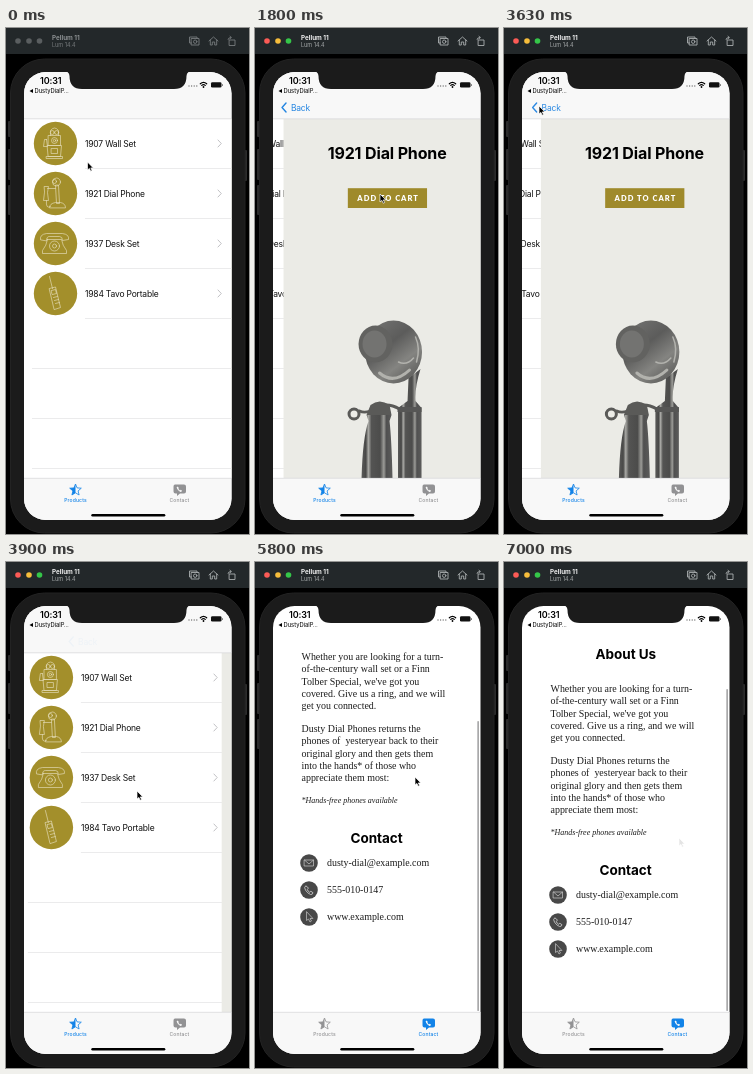
An HTML page that plays this animation: 243x506 px, repeating every 7.6 s.

```html
<!DOCTYPE html>
<html lang="en">
<head>
<meta charset="utf-8">
<title>Phone shop demo</title>
<style>
  html, body { margin: 0; width: 100%; height: 100%; overflow: hidden; background: #000; }
  svg { display: block; width: 100%; height: 100%; }
  text { font-family: Inter, "Open Sans", sans-serif; white-space: pre; }
  .row { font-size: 8.5px; letter-spacing: -.2px; fill: #111; }
  .head { font-size: 13.5px; font-weight: 700; letter-spacing: -.03px; text-anchor: middle; }
  .serif { font: 9.95px "Liberation Serif", "Noto Serif", serif; fill: #1c1c1c; }
  .note { font: italic 8px "Liberation Serif", "Noto Serif", serif; fill: #1c1c1c; }
  .tab { font-size: 5px; font-weight: 500; letter-spacing: .15px; text-anchor: middle; }
  .line { fill: none; stroke-linecap: round; stroke-linejoin: round; }
</style>
</head>
<body>
<svg viewBox="0 0 243 506" preserveAspectRatio="none">
  <defs>
    <clipPath id="screen"><rect x="18" y="44" width="207.500" height="448" rx="21.500"/></clipPath>
    <clipPath id="body"><rect x="18" y="91" width="208" height="359"/></clipPath>
    <clipPath id="page"><rect x="18" y="68" width="208" height="382"/></clipPath>
    <linearGradient id="tube">
      <stop offset="0" stop-color="#5a5a59"/><stop offset=".14" stop-color="#484847"/>
      <stop offset=".22" stop-color="#a9a9a5"/><stop offset=".32" stop-color="#545453"/>
      <stop offset=".6" stop-color="#4c4c4b"/><stop offset=".72" stop-color="#9c9c98"/>
      <stop offset=".8" stop-color="#505050"/><stop offset="1" stop-color="#5c5c5b"/>
    </linearGradient>
    <linearGradient id="disc" x1="0" y1="0" x2=".7" y2="1">
      <stop offset="0" stop-color="#777775"/><stop offset=".45" stop-color="#5c5c5b"/>
      <stop offset=".75" stop-color="#848481"/><stop offset="1" stop-color="#61615f"/>
    </linearGradient>

    <g id="wall">
      <path d="M-4-8V-13Q0-18 4-13V-8M-6-8H6V2H-6ZM-7 2H7L6 13H-6ZM-8 13H8V15H-8ZM-8-4h-2l-1 7h4l-1-7"/>
      <circle cx="-2.2" cy="-11" r="2"/><circle cx="2.2" cy="-11" r="2"/>
      <circle cy="-3" r="3"/><circle cy="-3" r="1.2"/>
      <path d="M-3 5H3V10H-3Z"/>
    </g>
    <g id="candle">
      <path d="M1-8L2 10H5L4-8Z"/>
      <path d="M-5 14Q-5 10 1 9H6Q11 10 11 14Z"/>
      <path d="M1-5H-7"/>
      <path d="M-10-7h4l-1 6 1 8h-5l1-8Z"/>
      <path fill="none" d="M-8 7Q-9 16-4 13"/>
      <circle cx="2" cy="-11.5" r="4"/><circle cx="0" cy="-12" r="2"/>
    </g>
    <g id="desk">
      <path d="M-7-4H7Q8 2 12 7V10H-12V7Q-8 2-7-4Z"/>
      <path d="M-14-4Q-15-9-8-10H8Q15-9 14-4L8-3Q8-7 5-7H-5Q-8-7-8-3Z"/>
      <circle cy="2.5" r="5"/><circle cy="2.5" r="2"/>
    </g>
    <g id="brick">
      <path d="M-5-17L-2-5"/>
      <path d="M-5-5L1-6.500L6 14L0 16Z"/>
      <path d="M-3-3L1-4L2 0L-2 1ZM-1 4L3 3M0 7L4 6M1 10L5 9"/>
    </g>
    <path id="star" d="M0-6L1.600-2.100L5.800-1.800L2.600.9L3.600 5L0 2.800L-3.600 5L-2.600.9L-5.800-1.800L-1.600-2.100Z"/>
    <path id="handset" d="M-2.800-3.200q-1.500 1 0 3.300q1.600 2.600 4 3.500q1.700.2 2-1.400l-1.700-1.200l-1 .8q-1.400-.8-2-2.300l.9-.8Z"/>
  </defs>

  <!-- device -->
  <g fill="#2b2b2b">
    <rect x="2" y="93" width="5" height="16" rx="1"/>
    <rect x="2" y="121" width="5" height="31" rx="1"/>
    <rect x="2" y="157" width="5" height="30" rx="1"/>
    <rect x="236" y="122" width="5" height="31" rx="1"/>
  </g>
  <rect x="4.500" y="31" width="234.500" height="474" rx="34" fill="#1b1b1b" stroke="#232323"/>

  <g clip-path="url(#screen)">
    <rect x="18" y="44" width="209" height="448" fill="#fff"/>
    <g id="shop">
      <g clip-path="url(#body)">
        <g id="list"></g>
        <g id="detail">
          <rect x="18" y="91" width="209" height="360" fill="#ebebe6"/>
          <text x="121.600" y="131" text-anchor="middle" font-size="16" font-weight="700" letter-spacing="-.14">1921 Dial Phone</text>
          <rect x="82.300" y="160.200" width="79.200" height="19.800" fill="#9f8a2b"/>
          <text x="122.600" y="173" text-anchor="middle" fill="#fff" style="font:900 7.500px Lato,sans-serif;letter-spacing:1.050px">ADD TO CART</text>
          <path class="line" d="M134 381Q120 373 110 381Q100 386 94 383" stroke="#5a5a58" stroke-width="3"/>
          <circle cx="88.500" cy="386" r="5" fill="none" stroke="#5a5a58" stroke-width="3"/>
          <path d="M105 377Q114 370 124 377L126 387H101Z" fill="#5a5a58"/>
          <path d="M101 387H126L124 393Q126 410 127 451H96Q97 410 103 393Z" fill="url(#tube)"/>
          <path d="M143 350L155 341Q149 360 150 373L156 380V451H132.500V380L142 373Z" fill="url(#tube)"/>
          <path d="M132 379H156V384H132Z" fill="#565655"/>
          <ellipse cx="128" cy="324" rx="28.500" ry="31.500" fill="url(#disc)"/>
          <g class="line" stroke="#b2b2ad">
            <path d="M114 345Q128 357 144 342" stroke-width="3"/>
            <path d="M133 334Q141 338 148 330M150 309Q155 320 151 334" stroke-width="1.500"/>
          </g>
          <ellipse cx="110" cy="316" rx="17" ry="18.500" fill="#626260"/>
          <ellipse cx="109" cy="316" rx="12" ry="13.500" fill="#737371"/>
        </g>
      </g>
      <rect x="18" y="44" width="209" height="47" fill="#f8f8f8"/>
      <path d="M18 90.800H227" stroke="#cfcfd0" stroke-width=".6"/>
      <g id="back">
        <path class="line" d="M29 75L25 79.500L29 84" stroke="#187fe0" stroke-width="1.400"/>
        <text class="row" x="33.900" y="82.600" style="fill:#187fe0">Back</text>
      </g>
    </g>
    <g id="about" clip-path="url(#page)">
      <g id="scroll">
        <rect x="18" y="68" width="209" height="63" fill="#c9c9c4"/>
        <g id="banner" class="line" stroke="#5d5d59" style="fill:#888883" stroke-width=".7">
          <path d="M70.500 86L71.500 113H74L73 86ZM62 119Q63 113 72 112Q80 113 81 119Z"/>
          <circle cx="71" cy="83" r="3.600"/><circle cx="69" cy="83" r="2"/>
          <path d="M71 94H64M48 111L57 108L59 111L50 114Z"/>
          <path d="M59 110Q62 118 64 116" fill="none"/>
          <use href="#desk" transform="translate(112 105.500) scale(1.08 1.3)"/>
          <use href="#brick" transform="translate(151 103) rotate(8) scale(1.05)"/>
          <rect x="176" y="98" width="10" height="18" rx="1.500" fill="#55555a"/>
          <rect x="177" y="100.500" width="8" height="12.500" fill="#c2c2bd" stroke="none"/>
        </g>
        <text class="head" x="121.800" y="164">About Us</text>
        <g id="copy"></g>
        <text class="note" x="46.500" y="339.500">*Hands-free phones available</text>
        <text class="head" x="121.600" y="380">Contact</text>
        <g id="contacts"></g>
      </g>
      <rect id="thumb" x="222.300" width="1.700" rx=".85" fill="#a9a9aa"/>
    </g>

    <!-- tab bar -->
    <rect x="18" y="450" width="209" height="42" fill="#f8f8f8"/>
    <path d="M18 450.300H227" stroke="#cfcfd0" stroke-width=".6"/>
    <g id="tabShop">
      <use href="#star" x="69.500" y="462" fill="none" stroke="currentColor" stroke-width=".8"/>
      <path d="M69.500 456L67.900 459.900L63.700 460.200L66.900 462.900L65.900 467L69.500 464.800Z" fill="currentColor"/>
      <text class="tab" x="69.500" y="473.500" fill="currentColor">Products</text>
    </g>
    <g id="tabContact">
      <path d="M169 456.500H178Q180 456.500 180 458.500V463.500Q180 465.500 178 465.500H174L171 468V465.500H169.500Q167.500 465.500 167.500 463.500V458.500Q167.500 456.500 169 456.500Z" fill="currentColor"/>
      <use href="#handset" transform="translate(173.500 461) scale(.8)" fill="#f8f8f8"/>
      <text class="tab" x="173.500" y="473.500" fill="currentColor">Contact</text>
    </g>
    <rect x="85.300" y="486" width="74" height="2.500" rx="1.250"/>

    <!-- status bar -->
    <text x="34" y="56.300" font-size="9" font-weight="600" letter-spacing="-.15">10:31</text>
    <path d="M27 61L23.500 63L27 65Z"/>
    <text x="28.500" y="65.200" font-size="5.800">DustyDialP…</text>
    <g fill="#777"><circle cx="183" cy="58" r=".7"/><circle cx="185.600" cy="58" r=".7"/><circle cx="188.200" cy="58" r=".7"/><circle cx="190.800" cy="58" r=".7"/></g>
    <path class="line" d="M194.300 55.800Q197.500 53 200.700 55.800M195.700 57.400Q197.500 56 199.300 57.400" stroke="#000" stroke-width="1.200"/>
    <circle cx="197.500" cy="59" r=".9"/>
    <rect x="205" y="54.300" width="10.500" height="5.200" rx="1.300" fill="#111"/>
    <rect x="216" y="56" width="1" height="1.900" rx=".5" fill="#777"/>
    <path d="M59 43Q63.500 44 63.500 48Q63.500 61 76 61H168Q180.500 61 180.500 48Q180.500 44 185 43Z" fill="#1b1b1b"/>
  </g>

  <!-- window bar -->
  <rect width="243" height="26" fill="#23282a"/>
  <g id="lights"></g>
  <text id="name" x="46" y="12" font-size="6.300" font-weight="700">Pellum 11</text>
  <text id="system" x="46" y="19" font-size="5.500">Lum 14.4</text>
  <g id="tools" class="line" stroke-width=".9">
    <path d="M183.500 13V9H191V10.500M185.500 10.500H193V17H185.500ZM183.500 13V15H185.500"/><circle cx="189.200" cy="13.700" r="1.700"/>
    <path d="M203 13L207.500 9L212 13M204.300 12V17H206.300V14H208.700V17H210.700V12"/>
    <path d="M223.500 12H229V17.500H223.500ZM222 11.500Q222 9.500 225 9.500M224 8.300L225.300 9.500L224 10.700"/>
  </g>

  <path id="cursor" d="M0 0V8L1.900 6.400L3.200 9.200L4.600 8.600L3.300 5.900H5.800Z" stroke="#fff" stroke-width=".7" stroke-linejoin="round"/>
</svg>
<script>
const LOOP = 7600;
const BLUE = '#1283e8', GREY = '#929294';
const $ = id => document.getElementById(id);
const clamp = v => Math.max(0, Math.min(1, v));
const show = (id, on) => $(id).style.display = on ? '' : 'none';
const shift = (id, x, y) => $(id).setAttribute('transform', `translate(${x.toFixed(2)} ${y.toFixed(2)})`);

function buildList() {
  const rows = [['wall', '1907 Wall Set'], ['candle', '1921 Dial Phone'],
    ['desk', '1937 Desk Set'], ['brick', '1984 Tavo Portable']];
  let s = '<rect x="18" y="91" width="209" height="360" fill="#fff"/>';
  rows.forEach(([icon, label], i) => {
    const y = 115.5 + 50 * i;
    s += `<circle cx="49.500" cy="${y}" r="21.700" fill="#a38f2b"/>
      <use href="#${icon}" x="48.500" y="${y}" class="line" stroke="#e6dfbd" stroke-width=".65"/>
      <text class="row" x="79" y="${y + 3}">${label}</text>
      <path class="line" d="M212 ${y - 3.5}l3.300 3.500l-3.300 3.500" stroke="#c2c2c5"/>`;
  });
  for (let i = 0; i < 7; i++)
    s += `<path d="M${i < 4 ? 79 : 26} ${140.5 + 50 * i}H227" stroke="#e2e2e4" stroke-width=".7"/>`;
  $('list').innerHTML = s;
}

// Small captions on both sides of each drawing
function bannerNotes() {
  const words = ['cradle', 'dial', 'hook', 'cord', 'base', 'bell', 'mouth'];
  let s = '';
  [71, 112, 151, 181].forEach((x, i) => {
    for (let k = 0; k < 8; k++) {
      const right = k % 2, y = 86 + 9 * (k >> 1) + 3 * ((k + i) % 2);
      const side = right ? 'start' : 'end', at = x + (right ? 1 : -1) * (i === 1 ? 16 : 11);
      s += `<text x="${at}" y="${y}" text-anchor="${side}" font-size="2.300">${words[(3 * k + i) % 7]}</text>`;
    }
    s += `<text x="${x + 12}" y="${i % 2 ? 92 : 118}" font-size="3.600" font-style="italic" fill="#555551">Fig ${i + 1}</text>`;
  });
  return `<g stroke="none" fill="#85857f">${s}</g>`;
}

function buildAbout() {
  const paragraphs = [
    [197, 'Whether you are looking for a turn-', 'of-the-century wall set or a Finn',
      "Tolber Special, we've got you", 'covered. Give us a ring, and we will', 'get you connected.'],
    [269, 'Dusty Dial Phones returns the', 'phones of  yesteryear back to their',
      'original glory and then gets them', 'into the hands* of those who', 'appreciate them most:']];
  $('copy').innerHTML = paragraphs.map(([y, ...lines]) => lines.map((line, i) =>
    `<text class="serif" x="46.500" y="${y + 12.3 * i}">${line}</text>`).join('')).join('');

  const icons = ['<path d="M-4.500-3H4.500V3H-4.500ZL0 1L4.500-3"/>',
    '<use href="#handset" transform="scale(1.25)"/>',
    '<path d="M-2.500-5V3.500L-.5 2L1 5L2.500 4L1 1.500H3.500Z"/>'];
  const labels = ['dusty-dial@example.com', '555-010-0147', 'www.example.com'];
  $('contacts').innerHTML = labels.map((label, i) => {
    const y = 400 + 27 * i;
    return `<circle cx="54" cy="${y}" r="8.800" fill="#484848"/>
      <g class="line" transform="translate(54 ${y})" stroke="#c9c9c9" stroke-width=".7">${icons[i]}</g>
      <text class="serif" x="72" y="${y + 3}">${label}</text>`;
  }).join('');

  $('banner').insertAdjacentHTML('beforeend', bannerNotes());
}

function buildLights() {
  $('lights').innerHTML = [12, 23, 33.5].map(x => `<circle cx="${x}" cy="13" r="2.800"/>`).join('');
}

// Short pauses in the motion: start, length
const pauses = [[2900, 100], [3900, 100], [5170, 100], [5800, 130]];
const path = [[330, 81.5, 134], [1070, 125, 166], [2899, 125, 166], [2900, 102, 142],
  [3400, 35, 78], [3700, 35, 78], [3900, 131, 229], [4530, 172, 462], [5169, 172, 462],
  [5170, 128, 390], [5530, 148, 355], [5640, 148, 355], [5800, 160, 215], [5930, 160, 215], [6430, 175, 276]];

function cursorAt(t) {
  const i = path.findIndex(k => k[0] > t);
  if (i === 0) return path[0].slice(1);
  if (i < 0) return path[path.length - 1].slice(1);
  const [a, b] = [path[i - 1], path[i]];
  const p = (t - a[0]) / (b[0] - a[0]), e = p * p * (3 - 2 * p);
  return [1, 2].map(n => a[n] + (b[n] - a[n]) * e);
}

// What remains of a critically damped move after the given time
function remain(ms) {
  const x = Math.max(0, ms) * 0.01623;
  return (1 + x) * Math.exp(-x);
}

function scrollAt(t) {
  if (t < 5900) return 99 * clamp((t - 5640) / 160);
  return 67 + 32 * remain(t - 5930);
}

function render(now) {
  let t = now % LOOP;
  for (const [start, length] of pauses)
    if (t >= start && t < start + length) t = start;

  const active = t >= 1270;
  const lights = active ? ['#fc5b56', '#f6bd3b', '#35c649'] : ['#5a5e60', '#5a5e60', '#5a5e60'];
  [...$('lights').children].forEach((c, i) => c.setAttribute('fill', lights[i]));
  $('name').setAttribute('fill', active ? '#f1f1f1' : '#8c9092');
  $('system').setAttribute('fill', active ? '#a6aaab' : '#777b7d');
  $('tools').setAttribute('stroke', active ? '#a9adae' : '#777b7d');

  const open = t < 3600 ? 1 - remain(t - 1510) : remain(t - 3600);
  shift('list', -91 * open, 0);
  shift('detail', 207 * (1 - open), 0);
  shift('back', 40 * (1 - open), 0);
  $('back').style.opacity = open;

  const contact = t >= 4670;
  show('shop', !contact);
  show('about', contact);
  $('tabShop').style.color = contact ? GREY : BLUE;
  $('tabContact').style.color = contact ? BLUE : GREY;

  const s = scrollAt(t), top = 60 + s;
  shift('scroll', 0, -s);
  show('thumb', t >= 5670);
  $('thumb').setAttribute('y', top);
  $('thumb').setAttribute('height', Math.min(449, top + 322) - top);

  shift('cursor', ...cursorAt(t));
  $('cursor').style.opacity = 1 - 0.9 * clamp((t - 6830) / 170);
}

buildList();
buildAbout();
buildLights();
const begin = performance.now();
function tick() {
  render(performance.now() - begin);
  requestAnimationFrame(tick);
}
tick();
</script>
</body>
</html>
```
